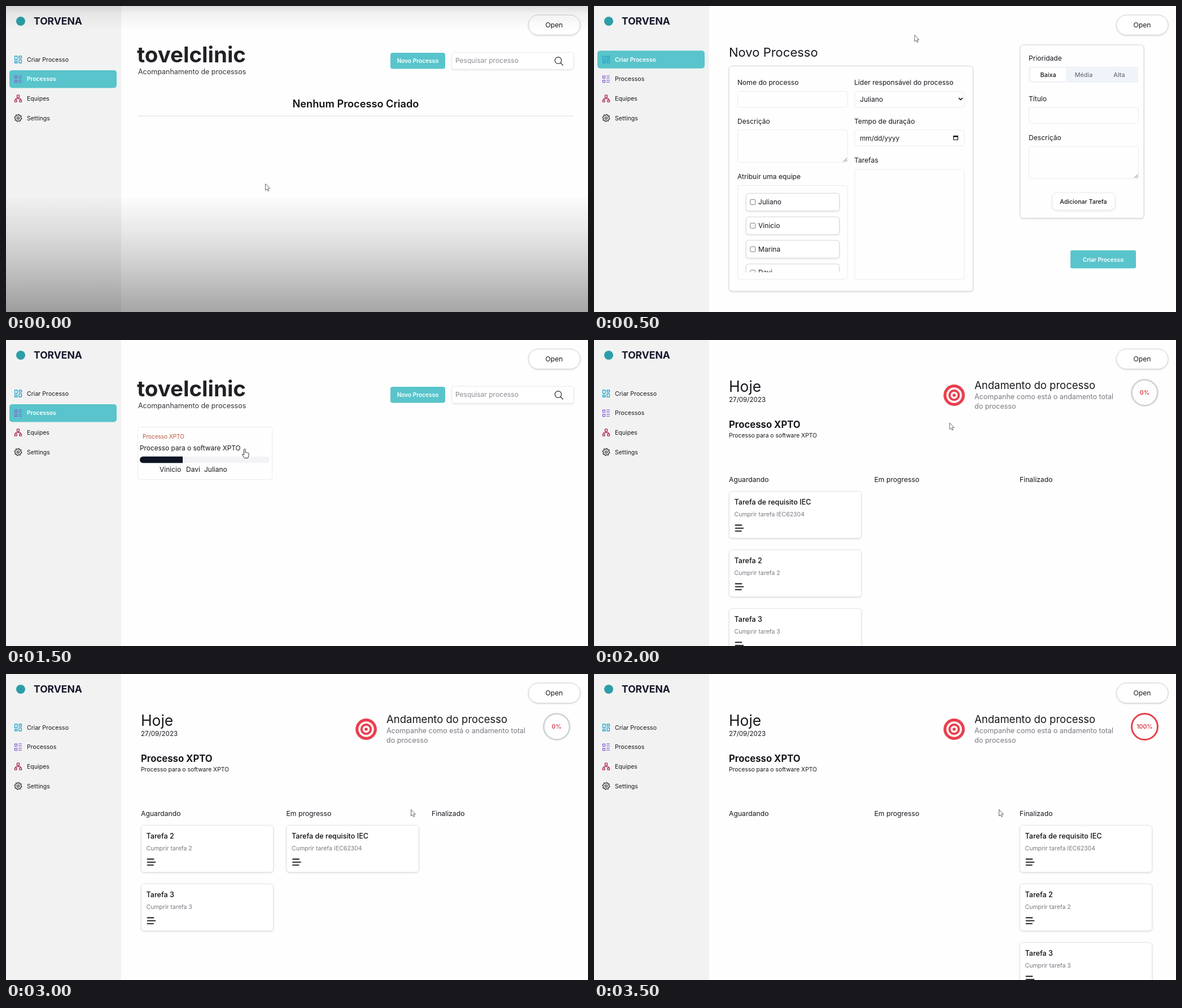
Recreate the animation shown at these times as an HTML page. Size 1031 by 543 pixels, loop 4 s.

```html
<!DOCTYPE html>
<html lang="pt">
<head>
<meta charset="utf-8">
<title>Processos</title>
<style>
  html, body { margin: 0; width: 100%; height: 100%; overflow: hidden; background: #fefefe; }
  svg { display: block; width: 1031px; height: 543px; font-family: Inter, "Open Sans", sans-serif; }
  .soft { filter: drop-shadow(0 1px 1.5px rgba(0, 0, 0, .12)); }
  .lift { filter: drop-shadow(0 1.5px 1.5px rgba(0, 0, 0, .14)); }
  .line { fill: none; stroke-linecap: round; stroke-linejoin: round; }
</style>
</head>
<body>
<svg id="stage" viewBox="0 0 1031 543" xmlns="http://www.w3.org/2000/svg"></svg>
<script>
const STEP = 500;
const TEAL = '#59c4cb', RED = '#e8404f', INK = '#16181d', GREY = '#777a80';
const people = ['Juliano', 'Vinicio', 'Marina', 'Davi'];
const tasks = [
  ['Tarefa de requisito IEC', 'Cumprir tarefa IEC62304'],
  ['Tarefa 2', 'Cumprir tarefa 2'],
  ['Tarefa 3', 'Cumprir tarefa 3'],
];
const columns = [239, 496.5, 754];

// Drawing helpers
const text = (x, y, value, size = 12.1, weight = 400, color = INK, anchor = 'start') =>
  `<text x="${x}" y="${y}" font-size="${size}" font-weight="${weight}" fill="${color}" text-anchor="${anchor}">${value}</text>`;
const box = (x, y, w, h, r = 4, fill = '#fff', stroke = 'none', cls = '') =>
  `<rect x="${x}" y="${y}" width="${w}" height="${h}" rx="${r}" fill="${fill}" stroke="${stroke}" class="${cls}"/>`;
const line = (d, color = INK, width = 1.3) =>
  `<path class="line" d="${d}" stroke="${color}" stroke-width="${width}"/>`;
const circle = (x, y, r, fill, stroke = 'none', width = 1) =>
  `<circle cx="${x}" cy="${y}" r="${r}" fill="${fill}" stroke="${stroke}" stroke-width="${width}"/>`;
const at = (x, y, content) => `<g transform="translate(${x} ${y})">${content}</g>`;
const field = (x, y, w, h) => box(x + .5, y + .5, w, h, 4, '#fefefe', '#e9ebef');
const grip = (x, y) => line(`M${x - 6} ${y}l6 -6M${x - 2.5} ${y}l2.5 -2.5`, '#666', 1);
const textLines = (x, y) => line(`M${x} ${y}h11M${x} ${y + 5.3}h14M${x} ${y + 10.6}h10.5`, INK, 1.8);

// Sidebar
const gear = () => {
  const points = Array.from({ length: 32 }, (_, i) => {
    const a = (i + .5) * Math.PI / 16, r = i % 4 < 2 ? 6.4 : 4.9;
    return `${(r * Math.cos(a)).toFixed(2)} ${(r * Math.sin(a)).toFixed(2)}`;
  });
  return line(`M${points.join('L')}Z`, '#333') + circle(0, 0, 2, 'none', '#333', 1.3);
};
const icons = [
  line('M-6 -6h4.5v6h-4.5ZM1.5 -6h4.5v3.5h-4.5ZM1.5 .5h4.5v5.5h-4.5ZM-6 3h4.5v3h-4.5Z', '#26a6c9'),
  line('M-6 -5.5h4v4h-4ZM-6 2h4v4h-4ZM1 -5.5h5M1 -2h5M1 2h5M1 5.5h5', '#8560cf'),
  line('M-2 -6h4v4h-4ZM-6 2.5h3.5v3.5h-3.5ZM2.5 2.5h3.5v3.5h-3.5ZM0 -2v2.2M-4.2 2.5v-2.3h8.4v2.3', '#ad2455'),
  gear(),
];
const menu = ['Criar Processo', 'Processos', 'Equipes', 'Settings'];
const sidebar = (active, fill) =>
  box(0, 0, 204, 543, 0, fill) +
  circle(26, 27, 8, '#2c9ea8') +
  text(49, 33, 'TORVENA', 17.5, 700, '#15172b') +
  menu.map((label, i) => {
    const y = 95 + i * 34.6, on = i === active;
    return (on ? box(6, y - 15.7, 190, 31.5, 5, TEAL) : '') +
      at(21.5, y, icons[i]) +
      text(37, y + 3.8, label, on ? 10.2 : 10.6, on ? 600 : 400, on ? '#fff' : INK);
  }).join('');

const openButton = box(925.5, 16, 91.5, 35.5, 17.8, '#fff', '#d0d0d0', 'lift') +
  text(971, 37.7, 'Open', 12.2, 400, INK, 'middle');

// Process list
const listHeader =
  text(232, 99.5, 'tovelclinic', 38.5, 700, '#202124') +
  text(234, 120.5, 'Acompanhamento de processos', 12.5, 400, '#33363b') +
  box(681, 83, 97, 28.5, 4, TEAL) +
  text(729.5, 101, 'Novo Processo', 10.1, 600, '#fff', 'middle') +
  box(790, 82.5, 215.5, 29.5, 4, '#fff', '#eee', 'soft') +
  text(796, 101, 'Pesquisar processo', 12, 400, '#8b8e94') +
  circle(978.2, 96.5, 5.8, 'none', '#333', 1.3) + line('M982.5 101l4 4', '#333');

const emptyList = listHeader +
  text(619.5, 180, 'Nenhum Processo Criado', 18.2, 600, '#111', 'middle') +
  line('M234 195H1005', '#dcdde0', 1.2);

const processList = listHeader +
  box(233.5, 154.5, 238, 93, 4, '#fefefe', '#e9eaed') +
  text(242, 174.5, 'Processo XPTO', 10, 400, '#b9563f') +
  text(237, 196, 'Processo para o software XPTO', 11.85) +
  box(237, 206.8, 230, 11.4, 5.7, '#f2f2f7') +
  '<path d="M242.7 206.8H313v11.4H242.7a5.7 5.7 0 0 1 0 -11.4Z" fill="#0f1424"/>' +
  text(272, 233.5, people[1], 12) + text(319, 233.5, people[3], 12) + text(351, 233.5, people[0], 12);

// New process form
const checkbox = (x, y, on) =>
  box(x, y, 9, 9, 1.5, on ? '#1673e6' : '#fff', on ? '#1673e6' : '#777') +
  (on ? line(`M${x + 2} ${y + 4.6}l2 2l3.4 -4.2`, '#fff', 1.4) : '');
const row = (x, y, content) => box(x, y, 165, 31, 4, '#fff', '#d9dade', 'soft') + content;

const form = filled => {
  const value = (x, y, s) => filled ? text(x, y, s, 11.6) : '';
  return text(239, 90, 'Novo Processo', 22) +
    box(239, 106.5, 432.5, 399.5, 5, '#fefefe', '#d5d6da', 'soft') +
    text(254, 140, 'Nome do processo') + field(254, 151, 194.5, 28.5) + value(261, 169.5, 'Processo XPTO') +
    text(254, 209, 'Descrição') + field(254, 219.5, 194.5, 57.5) + grip(448, 276) +
    value(259, 238, 'Processo para o software XPTO') +
    text(254, 307, 'Atribuir uma equipe') + field(254, 318, 194.5, 166.5) +
    '<g clip-path="url(#team)">' + people.map((name, i) => {
      const y = 332.5 + i * 41.8;
      return row(269.5, y, checkbox(276.8, y + 11, filled && i !== 2) + text(291, y + 19.5, name));
    }).join('') + '</g>' +
    text(461, 140, 'Líder responsável do processo') + field(461.5, 151, 194, 28.5) +
    text(471, 170, people[0]) + line('M646.5 163.5l3 3l3 -3', '#111', 1.7) +
    text(461, 209, 'Tempo de duração') + field(461.5, 219.5, 194, 28.5) +
    text(471, 238.5, filled ? '09/27/2023' : 'mm/dd/yyyy', 11.8) +
    line('M637 231h7.5v6.5h-7.5Z', '#111', 1.2) + box(636.5, 230, 8.5, 2.6, 0, '#111') +
    text(461, 278, 'Tarefas') + field(461.5, 289.5, 194, 195) +
    (filled ? tasks.map(([title], i) =>
      row(476.5, 304.5 + i * 41.8, text(485, 324 + i * 41.8, title, 11.4))).join('') : '') +
    box(755, 69, 219, 307.5, 5, '#fefefe', '#d5d6da', 'soft') +
    text(770, 97, 'Prioridade') + box(770, 107.5, 194, 28.5, 4, '#f0f3f8') +
    box(773, 110, 63, 23.5, 3) +
    text(804.5, 125.5, 'Baixa', 10.8, 500, INK, 'middle') +
    text(867.5, 125.5, 'Média', 10.7, 500, '#69727f', 'middle') +
    text(930.5, 125.5, 'Alta', 10.8, 500, '#69727f', 'middle') +
    text(770, 168.5, 'Título') + field(770, 179.5, 194, 28.5) + value(777, 198, tasks[2][0]) +
    text(770, 238, 'Descrição') + field(770, 248.5, 194, 57) + grip(963.5, 305) + value(775, 267, tasks[2][1]) +
    box(812, 331.5, 111, 30.5, 8, '#fff', '#ededf0', 'soft') +
    text(867, 350.5, 'Adicionar Tarefa', 10.6, 500, INK, 'middle') +
    box(844, 433.5, 116, 32, 3, TEAL) +
    text(902, 453.5, 'Criar Processo', 10.2, 600, '#fff', 'middle');
};

// Task board
const card = (column, slot, [title, detail]) => at(columns[column], 268 + slot * 104,
  box(.5, .5, 234, 83, 5, '#fff', '#e4e5e8', 'lift') +
  text(9.5, 23.5, title, 12.6, 500, '#0c0d10') +
  text(9.5, 45, detail, 10.5, 400, GREY) + textLines(11.5, 60.5));

const board = (placement, percent) =>
  text(239, 92, 'Hoje', 26.4) + text(239, 110, '27/09/2023', 11.6) +
  text(239, 155.5, 'Processo XPTO', 16.7, 700) +
  text(239, 172.5, 'Processo para o software XPTO', 10.35) +
  circle(638, 98, 16.3, '#fff', RED, 5.2) + circle(638, 98, 8.2, '#fff', RED, 4) + circle(638, 98, 2.8, RED) +
  text(674, 87, 'Andamento do processo', 18.5) +
  text(674, 104.5, 'Acompanhe como está o andamento total', 12.5, 400, GREY) +
  text(674, 122, 'do processo', 12.5, 400, GREY) +
  circle(975.5, 93.5, 23, 'none', percent === 100 ? RED : '#d2d5d7', 3) +
  text(975.5, 97, percent + '%', 10.4, 600, '#d53a49', 'middle') +
  ['Aguardando', 'Em progresso', 'Finalizado'].map((s, i) => text(columns[i], 251.5, s, 12.2)).join('') +
  placement.map(([column, slot], i) => card(column, slot, tasks[i])).join('');

const modalButton = (y, label, icon) =>
  box(723, y, 136, 29, 2, '#ebebeb') + at(735, y + 14.5, icon) + text(747, y + 18, label, 10.8, 600, '#222');

const modal =
  box(204, 0, 827, 543, 0, 'rgba(0,0,0,.5)') +
  box(360, 192.5, 519, 204.5, 4, '#fff') +
  line('M376.5 210h-2.3v12.5h12.4v-12.5h-2.3M377.5 208.5h5.6v3h-5.6ZM377 215.5h.3M379.7 215.5h4M377 219h.3M379.7 219h4', INK, 1.5) +
  text(398, 221.5, tasks[0][0], 17.3, 700) +
  textLines(374, 267.7) + text(398, 277, 'Descrição', 11.7, 600) +
  text(401, 303, tasks[0][1], 11.9) +
  box(723, 204, 136, 23, 11.5, '#fde3e5') + text(791, 219.5, 'Alta', 12.2, 600, '#581c24', 'middle') +
  text(723, 257, 'Entrar', 12) + text(723, 312, 'Ações', 12) +
  modalButton(262, 'Ingressar', circle(0, -2.5, 2.5, 'none', '#333', 1.1) + line('M-4.5 5.5v-1q0 -2.5 2.5 -2.5h4q2.5 0 2.5 2.5v1', '#333', 1.1)) +
  modalButton(317, 'Concluir', line('M5 0v5h-10v-10h8M-2.5 -1l2.5 2.5l5.5 -6', '#333', 1.1)) +
  modalButton(351, 'Sair', line('M-5.5 0h9M-2.5 -3l-3 3l3 3M5.5 -4v8', '#333', 1.1));

// Pointers
const arrow = (x, y) => at(x, y,
  '<path d="M0 0V11.5L2.7 9.2L4.4 13L6.2 12.2L4.6 8.4H8Z" fill="#fff" stroke="#555" stroke-width=".9"/>');
const hand = (x, y) => at(x, y,
  '<path d="M-2.5 -7.5q1.3 -1.6 2.6 0v5.5q1.2 -1 2.2 .3q1.2 -.7 2 .5q1.6 -.5 1.7 1.3v3.6l-1.4 4.3h-6l-3.9 -5.4q-.9 -2 1 -1.8l1.8 1.5Z" fill="#fff" stroke="#333"/>');
const beam = (x, y) => at(x, y, line('M-2 -6h4M0 -6v12M-2 6h4', '#555', 1));

const shade = box(0, 0, 1031, 45, 0, 'url(#top)') + box(0, 340, 1031, 203, 0, 'url(#bottom)');
const waiting = [[0, 0], [0, 1], [0, 2]];
const started = [[1, 0], [0, 0], [0, 1]];
const finished = [[2, 0], [2, 1], [2, 2]];

const scenes = [
  { active: 1, body: emptyList, over: shade + arrow(459.5, 315.5) },
  { active: 0, body: form(false), over: arrow(568, 51.5) },
  { active: 0, body: form(true), over: hand(904, 456) },
  { active: 1, body: processList, over: hand(424, 201.5) },
  { body: board(waiting, 0), over: arrow(630, 147) },
  { body: board(waiting, 0), over: modal + beam(582.5, 215), side: '#f4f6f6' },
  { body: board(started, 0), over: arrow(717.5, 240.5) },
  { body: board(finished, 100), over: arrow(717.5, 240.5) },
];

const gradient = (id, stops) => `<linearGradient id="${id}" x2="0" y2="1">` +
  stops.map(([offset, alpha]) => `<stop offset="${offset}" stop-opacity="${alpha}"/>`).join('') + '</linearGradient>';

const stage = document.getElementById('stage');
stage.innerHTML = '<defs><clipPath id="team"><rect x="262" y="326" width="180" height="146.5"/></clipPath>' +
  gradient('top', [[0, .13], [.3, .05], [1, 0]]) +
  gradient('bottom', [[0, .01], [.3, .09], [.6, .19], [1, .35]]) + '</defs>' +
  scenes.map(s => '<g class="scene" display="none">' + box(0, 0, 1031, 543, 0, '#fefefe') +
    sidebar(s.active, s.side || '#f2f2f2') + openButton + s.body + s.over + '</g>').join('');

const groups = [...stage.querySelectorAll('.scene')];
const start = performance.now();
let shown = -1;
function tick() {
  const index = Math.floor((performance.now() - start) / STEP) % groups.length;
  if (index !== shown) {
    groups.forEach((g, i) => g.setAttribute('display', i === index ? 'inline' : 'none'));
    shown = index;
  }
  requestAnimationFrame(tick);
}
tick();
</script>
</body>
</html>
```
